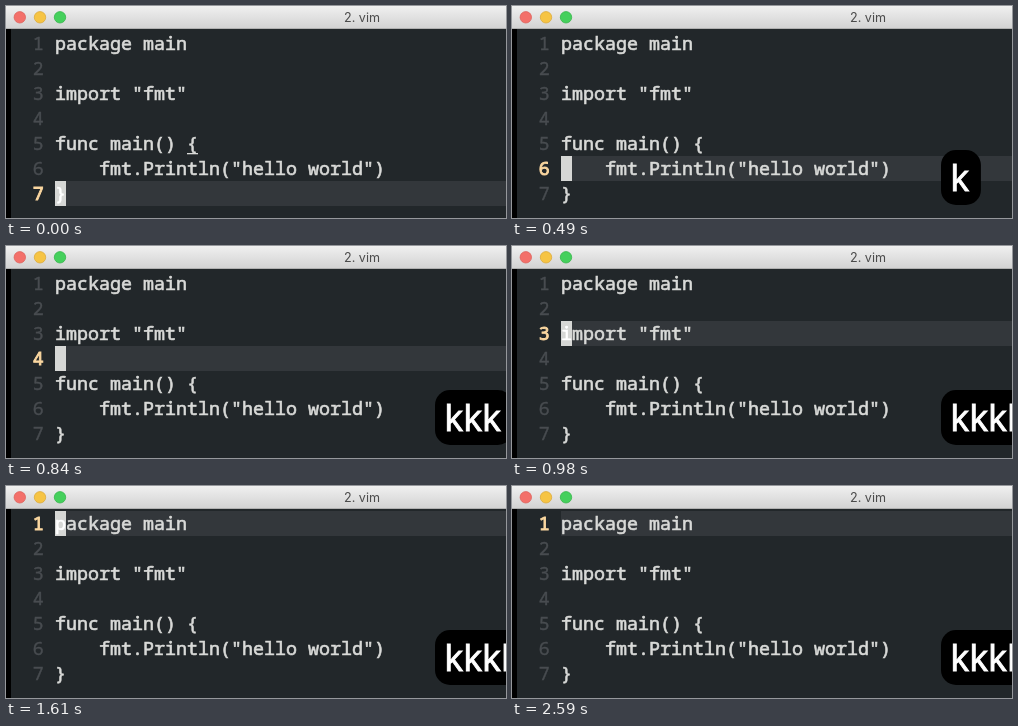
These frames come from a looping animation (500 px wide and 212 px high, 2660 ms). An HTML page:

```html
<!DOCTYPE html>
<html lang="en">
<head>
<meta charset="utf-8">
<title>Moving up in vim</title>
<style>
  html, body { margin: 0; width: 100%; height: 100%; overflow: hidden; background: #000; }
  svg { display: block; width: 100%; height: 100%; }
  text { white-space: pre; }
  .code {
    font: 18.333px "Noto Sans Mono", "DejaVu Sans Mono", monospace;
    fill: #d9dad8; stroke: #d9dad8; stroke-width: .65;
  }
  .num { fill: #484c50; stroke: #484c50; stroke-width: .4; }
  .num.on { fill: #fbd7a0; stroke: #fbd7a0; stroke-width: .9; }
  .title { font: 12.6px Inter, Roboto, sans-serif; fill: #4b4b4b; }
  .keys {
    font: 36px "Open Sans", "Noto Sans", sans-serif;
    fill: #fff; stroke: #fff; stroke-width: 1;
  }
</style>
</head>
<body>
<svg id="stage" viewBox="0 0 500 212">
  <defs>
    <linearGradient id="bar" x2="0" y2="1">
      <stop offset="0" stop-color="#f0f0f0"/>
      <stop offset="1" stop-color="#d3d3d3"/>
    </linearGradient>
  </defs>
  <rect width="500" height="212" fill="#000"/>
  <rect x="5" y="23" width="495" height="189" fill="#22272a"/>
  <rect width="500" height="22" fill="url(#bar)"/>
  <rect y="22" width="500" height="1" fill="#b0b0b0"/>
  <g stroke-width=".8">
    <circle cx="13.8" cy="11.3" r="5.7" fill="#f3706a" stroke="#dd625c"/>
    <circle cx="34" cy="11.3" r="5.7" fill="#f6c444" stroke="#dcab3c"/>
    <circle cx="54" cy="11.3" r="5.7" fill="#45d05c" stroke="#38b54c"/>
  </g>
  <text class="title" x="356" y="16" text-anchor="middle">2. vim</text>
  <rect id="line" x="49" width="451" height="25" fill="#33373b"/>
  <g id="code"></g>
  <rect id="match" x="181" y="147" width="11" height="1.3" fill="#d9dad8"/>
  <g id="cursor">
    <rect x="49" width="11" height="25" fill="#d6d7d5"/>
    <text id="under" class="code" x="49" y="18.6" style="fill:#fff;stroke:#fff"></text>
  </g>
  <g id="overlay">
    <rect id="box" x="429" y="144" height="55" rx="15" fill="#000"/>
    <text id="keys" class="keys" x="438.3" y="184.5"></text>
  </g>
</svg>
<script>
  const LOOP = 2660, STEP = 70, TOP = 25, ROW = 25, KEY = 18.9;
  const source = ['package main', '', 'import "fmt"', '', 'func main() {',
    '    fmt.Println("hello world")', '}'];
  const presses = [490, 770, 840, 980, 1260, 1610];
  const blinks = [[350, 490], [2590, LOOP]];

  const get = id => document.getElementById(id);
  const set = (el, attrs) => {
    for (const name in attrs) el.setAttribute(name, attrs[name]);
  };
  const show = (el, visible) => set(el, { visibility: visible ? 'visible' : 'hidden' });

  function addText(x, row, content) {
    const el = document.createElementNS('http://www.w3.org/2000/svg', 'text');
    set(el, { x, y: TOP + ROW * row + 18.6, class: 'code' });
    el.textContent = content;
    get('code').append(el);
    return el;
  }

  const numbers = source.map((content, row) => {
    addText(49, row, content);
    return addText(26.7, row, row + 1);
  });

  function render(time) {
    const t = Math.floor((time % LOOP) / STEP) * STEP;
    const count = presses.filter(at => t >= at).length;
    const row = source.length - 1 - count;
    const y = TOP + ROW * row;

    numbers.forEach((el, i) => set(el, { class: i === row ? 'code num on' : 'code num' }));
    set(get('line'), { y });
    set(get('cursor'), { transform: `translate(0 ${y})` });
    get('under').textContent = source[row].charAt(0);
    show(get('cursor'), !blinks.some(([from, to]) => t >= from && t < to));
    show(get('match'), count === 0);

    show(get('overlay'), count > 0);
    set(get('box'), { width: 21 + KEY * count });
    get('keys').textContent = 'k'.repeat(count);
  }

  const start = performance.now();
  function frame() {
    render(performance.now() - start);
    requestAnimationFrame(frame);
  }
  frame();
</script>
</body>
</html>
```
